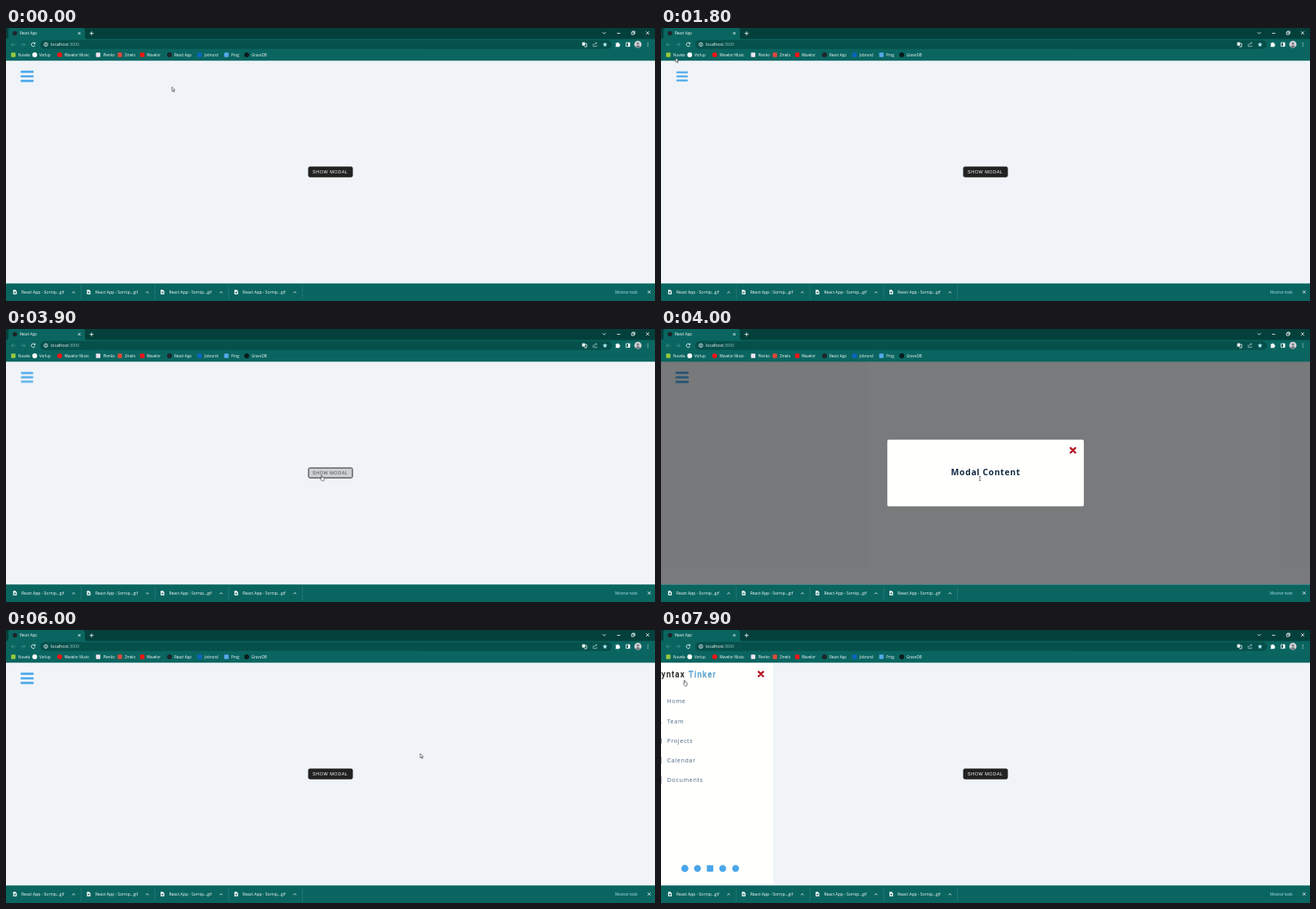
These frames come from a looping animation (798 by 336 pixels, 8 s). An HTML page:

```html
<!DOCTYPE html>
<html lang="en">
<head>
<meta charset="utf-8">
<title>Sidebar and modal</title>
<style>
  html, body { margin: 0; width: 100%; height: 100%; overflow: hidden; background: #f0f4f8; }
  svg { display: block; width: 798px; height: 336px; }
  text { font-family: "Open Sans", "Noto Sans", sans-serif; white-space: pre; }
  .ui text { fill: #fff; font-size: 4.5px; font-weight: 500; }
  .ui .url { font-size: 5.2px; font-weight: 400; }
  .ui .file { font-size: 5px; }
  .line { fill: none; stroke: #fff; stroke-width: .8; }
  .dim { stroke: #4d928d; }

  /* Every animation is paused and placed by --t, in ms. */
  .anim { animation: 8s linear calc(var(--t) * -1ms) infinite paused; }
  .bars {
    fill: #49a6e9; transform-origin: 25.95px 59.5px;
    animation: pulse 2s ease-in-out calc((var(--t) + 640) * -1ms) infinite paused;
  }
  @keyframes pulse { 50% { transform: scale(1.5); } }

  .btn rect { fill: #222; stroke: #222; animation-name: btn-fill; }
  .btn text { fill: #fff; font: 5.54px "Liberation Sans", Arial, sans-serif; letter-spacing: .5px; animation-name: btn-text; }
  @keyframes btn-fill { 0%, 45.6% { fill: #222; } 49.4%, 74.9% { fill: #f0f4f8; } 75%, 100% { fill: #222; } }
  @keyframes btn-text { 0%, 45.6% { fill: #fff; } 49.4%, 74.9% { fill: #222; } 75%, 100% { fill: #fff; } }

  .modal { animation-name: modal; animation-timing-function: step-end; }
  .modal text { fill: #102a42; font-size: 10.4px; font-weight: 700; letter-spacing: .66px; }
  @keyframes modal { 0% { visibility: hidden; } 50% { visibility: visible; } 75%, 100% { visibility: hidden; } }

  .side { animation-name: slide; }
  @keyframes slide { 0%, 95.6% { transform: translateX(-167px); } 99.4%, 100% { transform: none; } }
  .links text { fill: #486581; font-size: 7.2px; letter-spacing: .66px; }
  .logo { font: 500 10px Roboto, sans-serif; letter-spacing: 1px; text-shadow: 0 .9px .7px #0005; }
  .cross { fill: none; stroke: #b50d1f; stroke-width: 2.3; stroke-linecap: round; }

  .cursor { animation-name: move; animation-timing-function: ease-in-out; }
  .cursor path { stroke: #222; stroke-width: .6; fill: #fff; stroke-linejoin: round; }
  .cursor .anim { animation-timing-function: step-end; }
  .arrow { animation-name: arrow; }
  .hand { animation-name: hand; }
  .beam { animation-name: beam; }
  @keyframes move {
    0%, 5% { transform: translate(204px, 72.5px); }
    13.75%, 16.25% { transform: translate(118px, 73.5px); }
    22.5% { transform: translate(18px, 36.5px); }
    27.5%, 30% { transform: translate(22px, 44px); }
    45.6% { transform: translate(386px, 177px); }
    48.75% { transform: translate(388px, 179.8px); }
    50%, 52.5% { transform: translate(392px, 184px); }
    61.25%, 73.75% { transform: translate(511.3px, 151.8px); }
    75% { transform: translate(509.3px, 152px); }
    81.25% { transform: translate(67px, 82px); }
    86.25%, 100% { transform: translate(29px, 61.5px); }
  }
  @keyframes arrow {
    0% { visibility: visible; } 45.6% { visibility: hidden; }
    53.75% { visibility: visible; } 61.25% { visibility: hidden; }
    75% { visibility: visible; } 86.25%, 100% { visibility: hidden; }
  }
  @keyframes hand {
    0% { visibility: hidden; } 45.6% { visibility: visible; }
    50% { visibility: hidden; } 61.25% { visibility: visible; }
    75% { visibility: hidden; } 86.25%, 100% { visibility: visible; }
  }
  @keyframes beam { 0% { visibility: hidden; } 50% { visibility: visible; } 53.75%, 100% { visibility: hidden; } }
</style>
</head>
<body>
<svg viewBox="0 0 798 336">
  <rect width="798" height="336" fill="#f0f4f8"/>

  <g class="bars">
    <rect x="20.12" y="54.4" width="11.66" height="1.9" rx=".4"/>
    <rect x="20.12" y="58.55" width="11.66" height="1.9" rx=".4"/>
    <rect x="20.12" y="62.7" width="11.66" height="1.9" rx=".4"/>
  </g>

  <g class="btn">
    <rect class="anim" x="372" y="171" width="54" height="12.2" rx="1.5"/>
    <text class="anim" x="377" y="179">SHOW MODAL</text>
  </g>

  <g class="modal anim">
    <rect y="40" width="798" height="274.5" fill="#000" fill-opacity=".5"/>
    <rect x="278.3" y="136.2" width="241.6" height="82" rx="1.6" fill="#fffffd"/>
    <text x="356.6" y="179.5">Modal Content</text>
    <path class="cross" d="M503.6 146.4l5.8 5.8m0-5.8l-5.8 5.8"/>
  </g>

  <g class="side anim">
    <rect y="40" width="167" height="274.5" fill="#fffffd"/>
    <g class="logo">
      <text class="logo" x="58.4" y="58" text-anchor="end" fill="#2b2b2b">Syntax</text>
      <text class="logo" x="62.4" y="58" fill="#58b0e4">Tinker</text>
    </g>
    <path class="cross" d="M148.6 51.4l5.6 5.6m0-5.6l-5.6 5.6"/>
    <g class="links" id="links"></g>
    <g fill="#49a6e9">
      <circle cx="57.9" cy="293.5" r="4.4"/>
      <circle cx="73.4" cy="293.5" r="4.2"/>
      <rect x="84.9" y="289.5" width="8" height="8" rx=".8"/>
      <circle cx="104.4" cy="293.5" r="4.2"/>
      <circle cx="120.3" cy="293.5" r="4.2"/>
    </g>
  </g>

  <g class="ui">
    <rect width="798" height="14" fill="#03403c"/>
    <path d="M0 13.5Q3 13.5 3 10.5V3Q3 0 6 0H94Q97 0 97 3V10.5Q97 13.5 100 13.5H798V40.2H0Z" fill="#0a6560"/>
    <circle cx="11" cy="6.5" r="2.7" fill="#20232a"/>
    <text x="17" y="8.2">React App</text>
    <path class="line" d="M88.6 5l3 3m0-3l-3 3M102.8 6.6h4.8m-2.4-2.4v4.8"/>
    <path class="line" d="M733.5 5.2l2 2 2-2M751.3 6.5h4M769.2 5h3v3h-3zM770.2 5v-1h3v3h-1M787 4.2l3.8 3.8m0-3.8l-3.8 3.8"/>

    <rect x="42" y="14.8" width="703" height="11" rx="5.5" fill="#06504b"/>
    <path class="line dim" d="M11.5 20.3h-5m2.2-2.2l-2.2 2.2 2.2 2.2M18.5 20.3h5m-2.2-2.2l2.2 2.2-2.2 2.2"/>
    <path class="line" d="M35.3 18.9a2.3 2.3 0 1 0 .4 2.2M35.8 17.6v1.8h-1.8"/>
    <circle class="line" cx="49" cy="20.3" r="2.2" stroke-width=".6"/>
    <path class="line" d="M49 19.9v1.5M49 18.8v.5"/>
    <text class="url" x="55" y="22.2">localhost<tspan fill="#9cc5c2">:3000</tspan></text>
    <rect x="708.4" y="17.5" width="3.6" height="4.2" rx=".4" fill="#d5e7e6"/>
    <path class="line" stroke-width=".6" d="M712 19h2v4h-3M709.3 19.2h1.8v1.2h-1.8z"/>
    <path class="line" style="stroke:#9cc5c2" d="M722 19.5v3.2h4.2v-1.5M723 21q.3-2.5 3.5-2.5m-1.3-1.2l1.3 1.2-1.3 1.2"/>
    <path fill="#a9e4f2" d="M736.5 17.4l.9 1.9 2 .3-1.5 1.4.4 2-1.8-1-1.8 1 .4-2-1.5-1.4 2-.3z"/>
    <path fill="#fff" d="M749.6 18.4h1.6a.9.9 0 0 1 1.8 0h1.4v1.5a.9.9 0 0 1 0 1.8v1.5h-4.8v-1.6a.9.9 0 0 0 0-1.7z"/>
    <path class="line" d="M762.4 18h4.6v4.6h-4.6z"/>
    <path fill="#fff" d="M765 18h2v4.6h-2z"/>
    <circle cx="777" cy="20.2" r="4.4" fill="#d3d5d8"/>
    <path fill="#777d84" d="M774 23.4q.4-2.5 3-2.5t3 2.5q-3 2.2-6 0z"/>
    <circle cx="777" cy="19" r="1.6" fill="#777d84"/>
    <path fill="none" stroke="#fff" stroke-width="1.1" stroke-linecap="round" stroke-dasharray="0 2" d="M789.2 18.3v4.1"/>
    <g id="marks"></g>

    <rect y="314.4" width="798" height="21.6" fill="#0a6560"/>
    <g id="files"></g>
    <text x="749" y="327" style="fill:#b9e8ef">Mostrar todo</text>
    <path class="line" d="M789 323.2l3.6 3.6m0-3.6l-3.6 3.6"/>
  </g>

  <g class="cursor anim">
    <path class="arrow anim" d="M0 0V5.4L1.3 4.3 2.2 6.3 3 5.9 2.2 4H3.8Z"/>
    <path class="hand anim" d="M-.6 .6q.6-1 1.2 0V2.7l2 .4q.8.2.7 1L2.9 7H.2L-1.6 4.4q.2-.9 1 -.1Z"/>
    <path class="beam anim" d="M-1-2.6h2M0-2.6v5.2M-1 2.6h2"/>
  </g>
</svg>
<script>
  const $ = id => document.getElementById(id);

  // icon x, round icon?, colour, label x, label
  const marks = [
    [9, 0, '#98ca3f', 15, 'Nuvela'], [35.3, 1, '#fff', 41, 'Vorlup'],
    [66, 1, '#f01414', 72, 'Wavelor Music'], [113.3, 0, '#eee3ee', 119.5, 'Plenko'],
    [140, 0, '#e0473a', 146, 'Zmelo'], [167.6, 0, '#f01414', 173, 'Wavelor'],
    [201, 1, '#20232a', 207, 'React App'], [238, 0, '#0a66c2', 244, 'Jobrund'],
    [271, 0, '#55a9ea', 277, 'Prog'], [296, 1, '#0b1a1c', 302, 'GravoDB']
  ];
  const icon = (x, round, color) => round
    ? `<circle cx="${x}" cy="33" r="3" fill="${color}"/>`
    : `<rect x="${x - 2.7}" y="30.3" width="5.4" height="5.4" rx=".8" fill="${color}"/>`;
  $('marks').innerHTML = marks.map(([x, round, color, tx, label]) =>
    icon(x, round, color) + `<text x="${tx}" y="34.7">${label}</text>`).join('');

  $('files').innerHTML = [0, 1, 2, 3].map(i => `<g transform="translate(${i * 90.7})">
    <path fill="#fff" d="M8.8 322.3h2.8l1.6 1.6v3.8H8.8z"/>
    <path fill="#0a6560" d="M10 324.6h2v1.8h-2z"/>
    <text class="file" x="19" y="327.2">React App - Sornip...gif</text>
    <path class="line" d="M81.4 326.2l1.7-1.7 1.7 1.7"/>
    <path stroke="#2f827d" stroke-width=".6" d="M92.4 317v17"/></g>`).join('');

  const shapes = [
    'M17 88l6-5.5 6.3 5.5h-1.5v5H18.5v-5z', 'M18 115q0-3 5.2-3t6.2 3zM21 109a2 2 0 1 0 4 0 2 2 0 1 0-4 0z',
    'M18 132h4l1 1.3h6.2v6.5H18z', 'M19 156h10v9H19z', 'M21 180h8v9h-8z'
  ];
  $('links').innerHTML = ['Home', 'Team', 'Projects', 'Calendar', 'Documents'].map((label, i) =>
    `<path fill="#486581" d="${shapes[i]}"/><text x="36" y="${90.4 + i * 24.15}">${label}</text>`).join('');

  const start = performance.now();
  function tick() {
    const t = Math.floor((performance.now() - start) % 8000 / 100) * 100;
    document.documentElement.style.setProperty('--t', t);
    requestAnimationFrame(tick);
  }
  tick();
</script>
</body>
</html>
```
